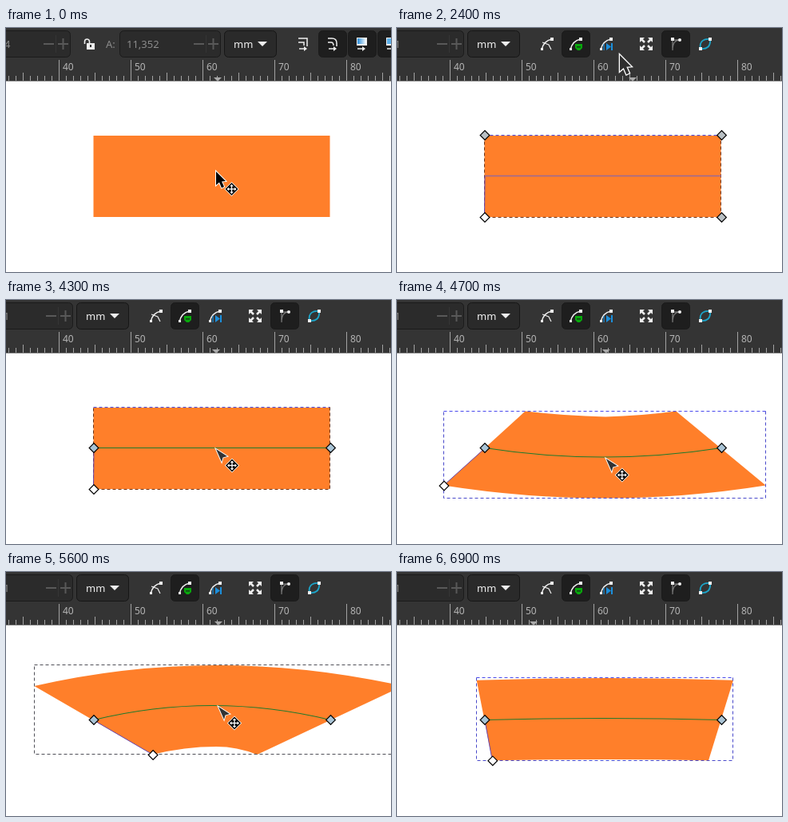
An HTML page with a canvas that plays this animation: 482 by 306 pixels, repeating every 7.5 s.

```html
<!DOCTYPE html>
<html>
<head>
<meta charset="utf-8">
<style>
  html, body { margin: 0; height: 100%; overflow: hidden; background: #fff; }
  canvas { display: block; }
</style>
</head>
<body>
<canvas id="stage" width="482" height="306"></canvas>
<script>
const g = document.getElementById('stage').getContext('2d');
const LOOP = 7500, STEP = 100;
const ORANGE = '#ff7f2a', LIGHT = '#eee', DIM = '#8b8b8b', DARK = '#1e1e1e';
const LEFT = 110, RIGHT = 406, MID = 186, HALF = 51;

// time, x, y, pointer kind, move badge
const POINTER = [
  [0, 263, 180, 'select', 1], [100, 263, 180, 'select', 0], [300, 262, 184, 'select', 1],
  [600, 248, 237, 'select', 0], [1000, 231, 310, 'select', 0], [1100, 230, 268, 'select', 0],
  [1200, 229, 190, 'select', 1], [1300, 229, 137, 'select', 1], [1600, 229, 137, 'select', 1],
  [1700, 229, 133, 'select', 0], [1800, 229, 130, 'select', 0], [1900, 229, 130, 'select', 0],
  [2000, 234, 125, 'node', 0], [2300, 295, 67, 'node', 0], [2400, 279, 34, 'system', 0],
  [2700, 262, 24, 'system', 0], [2900, 262, 26, 'system', 0], [3100, 261, 74, 'node', 0],
  [3500, 261, 177, 'node', 1], [3800, 262, 179, 'node', 1], [4000, 262, 179, 'node', 1],
  [4100, 262, 186, 'node', 1], [4200, 262, 186, 'node', 1], [4300, 263, 187, 'node', 1],
  [4500, 263, 187, 'node', 1], [5000, 260, 217, 'node', 1], [5100, 260, 217, 'node', 1],
  [5300, 262, 199, 'node', 1], [5600, 266, 169, 'node', 1], [5700, 267, 166, 'node', 1],
  [5800, 267, 166, 'node', 1], [6400, 264, 184, 'node', 1], [6500, 264, 174, 'node', 0],
  [6600, 264, 165, 'node', 0], [6700, 171, 70, 'node', 0], [6800, 136, 10, 'system', 0],
  [6900, 120, -40, 'system', 0]
];
// time, sag of the bend path
const BEND = [
  [4500, 0], [4600, 4], [5000, 34], [5100, 34], [5200, 27], [5300, 14], [5500, -11],
  [5600, -18], [5700, -20.5], [5800, -20.5], [6400, -2]
];

function sample(keys, t) {
  let i = keys.findIndex(k => k[0] > t) - 1;
  if (i === -2) return keys[keys.length - 1];
  if (i < 0) return keys[0];
  const a = keys[i], b = keys[i + 1], u = (t - a[0]) / (b[0] - a[0]);
  return a.map((v, j) => j < 3 && typeof v === 'number' ? v + (b[j] - v) * u : v);
}

function path(points, closed) {
  g.beginPath();
  points.forEach(([x, y]) => g.lineTo(x, y));
  if (closed) g.closePath();
}
function line(points, color, width = 1) {
  path(points);
  g.strokeStyle = color;
  g.lineWidth = width;
  g.stroke();
}
function shape(points, fill, stroke, width = 1) {
  path(points, true);
  if (stroke) { g.strokeStyle = stroke; g.lineWidth = width; g.stroke(); }
  g.fillStyle = fill;
  g.fill();
}
function curve(d, color, width = 1) {
  g.strokeStyle = color;
  g.lineWidth = width;
  g.stroke(new Path2D(d));
}
function box(x, y, w, h, color) {
  g.fillStyle = color;
  g.fillRect(x, y, w, h);
}
function label(text, x, y, color, size = 13) {
  g.font = size + 'px "Noto Sans", "Open Sans", sans-serif';
  g.fillStyle = color;
  g.fillText(text, x, y);
}
function panel(x, w, fill, border = '#1b1b1b') {
  g.beginPath();
  g.roundRect(x + .5, 3.5, w - 1, 33, 5);
  g.fillStyle = fill;
  g.fill();
  g.strokeStyle = border;
  g.lineWidth = 1;
  g.stroke();
}
function at(x, y, draw, angle = 0) {
  g.save();
  g.translate(x, y);
  g.rotate(angle);
  draw();
  g.restore();
}

function spinField(x, w, text, textX, color, signColor) {
  panel(x, w, '#2b2b2b');
  label(text, textX, 25, color);
  const end = x + w;
  box(end - 34, 19, 13, 2, signColor);
  box(end - 16, 19, 13, 2, signColor);
  box(end - 10.5, 13, 2, 14, signColor);
  box(end - 19, 9, 1, 22, '#363636');
}
function unitButton(x, w) {
  panel(x, w, '#2a2a2a', '#161616');
  label('mm', x + 12, 25, LIGHT);
  const c = x + w - 18;
  shape([[c - 6, 17], [c + 6, 17], [c, 23]], LIGHT);
}
function scaleArrow() {
  line([[-5, 6], [2, 6]], LIGHT, 1.5);
  shape([[1, 3], [5, 6], [1, 9]], LIGHT);
}

function selectToolbar(active) {
  const text = active ? '#fff' : DIM, sign = active ? '#f2f2f2' : '#595959';
  spinField(-20, 101, '4', -2, text, sign);
  box(101, 19, 10, 8, LIGHT);
  box(105, 21, 2, 3, '#333');
  curve('M98.5 20v-3a3 3 0 0 1 6 0v2', LIGHT, 1.6);
  label('A:', 125, 25, active ? '#ddd' : DIM);
  spinField(142, 127, '11,352', 151, text, sign);
  unitButton(273, 66);
  [391, 428, 465].forEach(x => panel(x, 36, DARK));
  at(372, 20, () => {
    curve('M-6 -7H5V3M-6 -2H1V2', LIGHT, 1.5);
    scaleArrow();
  });
  at(409, 20, () => {
    curve('M-6 -7H-1Q5 -7 5 -1V3M-6 -2H-2Q1 -2 1 2', LIGHT, 1.5);
    scaleArrow();
  });
  [445, 482].forEach((x, i) => at(x, 20, () => {
    const blue = g.createLinearGradient(-6, 0, 6, 0);
    blue.addColorStop(0, '#1583d8');
    blue.addColorStop(1, '#fff');
    box(-6, -8, 13, 10, LIGHT);
    box(-5, -7, 11, 7, i ? '#5bb0ea' : blue);
    scaleArrow();
  }));
}

function nodeCurve() {
  curve('M-7 8Q-5 -4 6 -6', LIGHT, 1.5);
  box(4, -8, 4, 4, LIGHT);
  box(-8, 5, 3, 3, LIGHT);
}
function nodeToolbar(hover) {
  spinField(-20, 104, '1', -3, DIM, '#595959');
  unitButton(88, 66);
  panel(206, 36, DARK);
  panel(331, 36, DARK);
  if (hover) panel(244, 36, '#444');
  at(188, 20, () => {
    nodeCurve();
    curve('M-6 -2L2 1L5 7', LIGHT, 1.2);
  });
  at(224, 20, () => {
    nodeCurve();
    shape([[-1, 0], [8, 0], [8, 5], [5, 8], [2, 8], [-1, 5]], '#08a80c');
    box(1, 3, 5, 1.5, '#153c16');
  });
  at(262, 20, () => {
    nodeCurve();
    shape([[0, -1], [6, 3.5], [0, 8]], '#1c8fdc');
    box(6, -1, 2, 9, '#1c8fdc');
    line([[-3, 0], [-3, 8]], '#1c8fdc', 1.2);
  });
  at(312, 20, () => {
    for (let i = 0; i < 4; i++) at(0, 0, () => {
      shape([[-8, -8], [-2, -8], [-8, -2]], LIGHT);
      line([[-6, -6], [-2, -2]], LIGHT, 2.5);
    }, i * Math.PI / 2);
  });
  at(349, 20, () => {
    curve('M-4 8Q-4 -5 5 -5M-4 -5V6', '#777', 1.3);
    line([[-4, -5], [4, -5]], '#999');
    box(-6, -8, 4, 4, LIGHT);
    g.fillStyle = LIGHT;
    g.beginPath();
    g.arc(5, -5, 2, 0, 7);
    g.fill();
  });
  at(386, 20, () => {
    curve('M-6 6C-8 -4 -1 -7 6 -6C7 3 2 7 -6 6', '#1ca4c8', 1.8);
    box(4, -8, 4, 4, LIGHT);
    box(-8, 4, 4, 4, LIGHT);
  });
}

function ruler(marker) {
  for (let mm = 32; mm < 87; mm++) {
    const x = 66 + (mm - 40) * 9;
    const h = mm % 10 === 0 ? 26 : mm % 5 === 0 ? 10 : 6;
    box(x, 66 - h, 1, h, '#a2a2a2');
    if (mm % 10 === 0) label(mm, x + 5, 53, '#b5b5b5', 12);
  }
  box(0, 66, 482, 1, '#777');
  shape([[marker - 5, 62], [marker + 5, 62], [marker, 67]], '#a8a8a8');
}

// Corner offsets grow faster than the sag, which makes the ends flare.
function bentCorners(d) {
  const a = Math.abs(d), s = Math.sign(d);
  const left = s * (5 * a - .049 * a * a);
  const right = left + s * (d < 0 ? 4 : 1.5) * Math.sqrt(a);
  const y = HALF - .3 * a - .0081 * a * a;
  return {
    tl: [LEFT - .5 + left, MID - y], bl: [LEFT - .5 - left, MID + y],
    tr: [RIGHT - .5 - right, MID - y], br: [RIGHT - .5 + right, MID + y],
    top: [262 - d / 12, MID + d - HALF], bottom: [262 - d / 12, MID + d + HALF]
  };
}
function bentShape(c, d) {
  const half = (from, to, mid, end, pull) => g.quadraticCurveTo(
    (from[0] + to[0]) / 2, mid[1] + (end[1] - mid[1]) * pull, to[0], to[1]);
  const up = Math.max(0, d) / 68;
  g.beginPath();
  g.moveTo(...c.tl);
  half(c.tl, c.top, c.top, c.tl, up);
  half(c.top, c.tr, c.top, c.tr, up);
  g.lineTo(...c.br);
  half(c.br, c.bottom, c.bottom, c.br, 0);
  half(c.bottom, c.bl, c.bottom, c.bl, 0);
  g.closePath();
  g.fillStyle = ORANGE;
  g.fill();
}
function bounds(c, d) {
  const xs = [c.tl, c.tr, c.bl, c.br].map(p => p[0]);
  const ys = Object.values(c).map(p => p[1]);
  const snap = v => Math.floor(v) + .5;
  const x0 = snap(Math.min(...xs)), x1 = snap(Math.max(...xs));
  const y0 = snap(Math.min(...ys) - .5), y1 = snap(Math.max(...ys));
  const side = d === 0 ? '#6b351c' : d < -8 ? '#505058' : '#4a4acb';
  g.setLineDash([4, 3]);
  line([[x0, y0], [x1, y0]], d < -8 ? side : '#4a4aee');
  line([[x1, y0], [x1, y1], [x0, y1], [x0, y0]], side);
  g.setLineDash([]);
}

function scaleHandle(x, y, angle) {
  at(x, y, () => shape([[-7.5, 0], [-3, -4.5], [-3, -2], [3, -2], [3, -4.5], [7.5, 0],
    [3, 4.5], [3, 2], [-3, 2], [-3, 4.5]], '#000'), angle);
}
function scaleHandles() {
  const q = Math.PI / 4;
  scaleHandle(104, 129, q);
  scaleHandle(411.5, 243, q);
  scaleHandle(411.5, 129, -q);
  scaleHandle(104, 243, -q);
  scaleHandle(100.5, 185.5, 0);
  scaleHandle(414.5, 185.5, 0);
  scaleHandle(257.5, 125.5, 2 * q);
  scaleHandle(257.5, 246, 2 * q);
}
function node(x, y, fill) {
  shape([[x - 5, y], [x, y - 5], [x + 5, y], [x, y + 5]], fill, '#000', 2.4);
}

function moveBadge() {
  shape([[0, -8], [8, 0], [0, 8], [-8, 0]], '#000', '#fff', 1.5);
  line([[-5, 0], [5, 0]], '#fff', 1.3);
  line([[0, -5], [0, 5]], '#fff', 1.3);
  for (let i = 0; i < 4; i++) {
    at(0, 0, () => shape([[6, 0], [3.5, -2.3], [3.5, 2.3]], '#fff'), i * Math.PI / 2);
  }
}
function pointer(x, y, kind, badge) {
  at(x, y, () => {
    const arrow = [[0, 0], [0, 17], [4, 13.5], [7, 20.5], [10, 19], [7, 12.5], [12, 12]];
    if (kind === 'select') shape(arrow, '#000', '#fff', 2);
    if (kind === 'system') shape(arrow.map(p => p.map(v => v * 1.18)), '#2e2e2e', '#fff', 2.6);
    if (kind === 'node') shape([[0, 0], [14, 9], [8.5, 10.5], [7, 16]], '#333', '#fff', 1.8);
    if (badge) at(kind === 'node' ? 20 : 19.5, kind === 'node' ? 20.5 : 22, moveBadge);
  });
}

function draw(t) {
  const [, x, y, kind, badge] = sample(POINTER, t);
  const d = sample(BEND, t)[1];
  const selected = t >= 300, nodeTool = t >= 2000, bending = t >= 2900;
  const c = bentCorners(d);

  box(0, 0, 482, 306, '#fff');
  bentShape(c, d);
  if (selected) bounds(c, d);
  if (selected && !nodeTool) scaleHandles();
  if (nodeTool) {
    line([[LEFT, MID], c.bl], '#6648b4');
    curve(`M${LEFT} ${MID - .5}Q258 ${MID - .5 + 2 * d} ${RIGHT} ${MID - .5}`,
      bending ? '#1f7a2c' : '#9a6a96', bending ? 1.2 : 1.6);
    if (bending) {
      node(LEFT, MID - .5, '#a9c4d6');
      node(RIGHT + .5, MID - .5, '#a9c4d6');
    } else {
      node(LEFT, 134.5, '#b9c0c4');
      node(RIGHT + .5, 134.5, '#b9c0c4');
      node(RIGHT + .5, 237.5, '#b9c0c4');
    }
    node(c.bl[0] + .5, c.bl[1] + .5, '#fff');
  }

  box(0, 0, 482, 67, '#343434');
  if (nodeTool) nodeToolbar(t >= 2600 && t < 3000);
  else selectToolbar(selected);
  ruler(y >= 67 ? x + (t < 100 ? 2 : 0) : t < 4000 ? 295 : 171);
  pointer(x, y, kind, badge);
}

function frame() {
  draw(Math.floor(performance.now() % LOOP / STEP) * STEP);
  requestAnimationFrame(frame);
}
frame();
</script>
</body>
</html>
```
